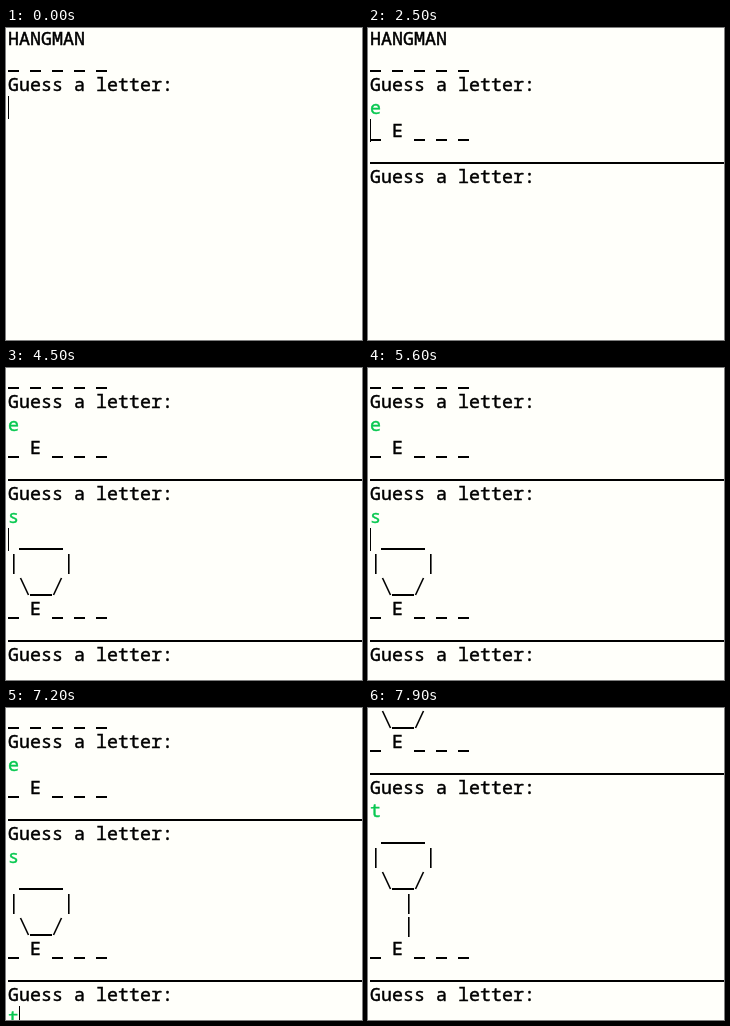
Write an HTML page with a canvas that moves like this. It is 356 by 312 pixels and loops after 8 s.

```html
<!DOCTYPE html>
<html lang="en">
<head>
<meta charset="utf-8">
<title>Hangman console</title>
<style>
  html, body { margin: 0; overflow: hidden; background: #fffffa; }
  canvas { display: block; }
</style>
</head>
<body>
<canvas id="stage" width="356" height="312"></canvas>
<script>
const ctx = document.getElementById('stage').getContext('2d');
const LOOP = 8000, TICK = 100, BLINK = 530;
const LEFT = 2, COL = 11, ROW = 23, BASE = 17;
const INK = '#000', INPUT = '#08c850', PAPER = '#fffffa';

const rule = '_'.repeat(33);
const prompt = [rule, 'Guess a letter:'];
const head = [' ____', '|    |', ' \\__/'];
const neck = ['   |', '   |'];
const word = '_ E _ _ _';
const lines = [
  'HANGMAN', '_ _ _ _ _', 'Guess a letter:', 'e',
  word, ...prompt, 's',
  ...head, word, ...prompt, 't',
  ...head, ...neck, word, ...prompt
];
const inputs = [3, 7, 14];

// at: start time, count: lines shown, top: first visible line, row/col: caret
const states = [
  { at: 0,    count: 3,  top: 0,  row: 3,  col: 0 },
  { at: 1400, count: 4,  top: 0,  row: 3,  col: 1 },
  { at: 2400, count: 7,  top: 0,  row: 4,  col: 0 },
  { at: 4000, count: 8,  top: 0,  row: 7,  col: 1 },
  { at: 4400, count: 14, top: 1,  row: 8,  col: 0 },
  { at: 6900, count: 15, top: 1,  row: 14, col: 1 },
  { at: 7300, count: 23, top: 10, row: 15, col: 0 }
];

function slash(x1, x2, y) {
  ctx.lineWidth = 1.6;
  ctx.beginPath();
  ctx.moveTo(x1, y - 14);
  ctx.lineTo(x2, y + 3);
  ctx.stroke();
}

// A thin outline gives the letters their sturdier console weight.
function letter(ch, x, y) {
  ctx.lineWidth = 0.45;
  ctx.fillText(ch, x, y);
  ctx.strokeText(ch, x, y);
}

function drawChar(ch, x, y) {
  if (ch === '_') ctx.fillRect(x, y + 2, COL, 2);
  else if (ch === '|') ctx.fillRect(x + 5, y - 15, 1.6, 20);
  else if (ch === '\\') slash(x + 1.5, x + 9.5, y);
  else if (ch === '/') slash(x + 9.5, x + 1.5, y);
  else letter(ch, x + COL / 2, y);
}

function draw(time) {
  const state = states.findLast(s => s.at <= time);
  ctx.fillStyle = PAPER;
  ctx.fillRect(0, 0, 356, 312);
  ctx.font = '18.33px "Noto Sans Mono", "DejaVu Sans Mono", monospace';
  ctx.textAlign = 'center';

  for (let i = state.top; i < state.count; i++) {
    ctx.fillStyle = ctx.strokeStyle = inputs.includes(i) ? INPUT : INK;
    const y = BASE + (i - state.top) * ROW;
    [...lines[i]].forEach((ch, c) => drawChar(ch, LEFT + c * COL, y));
  }

  if (Math.floor((time - state.at) / BLINK) % 2 === 0) {
    ctx.fillStyle = INK;
    ctx.fillRect(LEFT + state.col * COL, (state.row - state.top) * ROW - 1, 1, ROW);
  }
}

const start = performance.now();
function frame() {
  const time = (performance.now() - start) % LOOP;
  draw(Math.floor(time / TICK) * TICK);
  requestAnimationFrame(frame);
}
frame();
</script>
</body>
</html>
```
